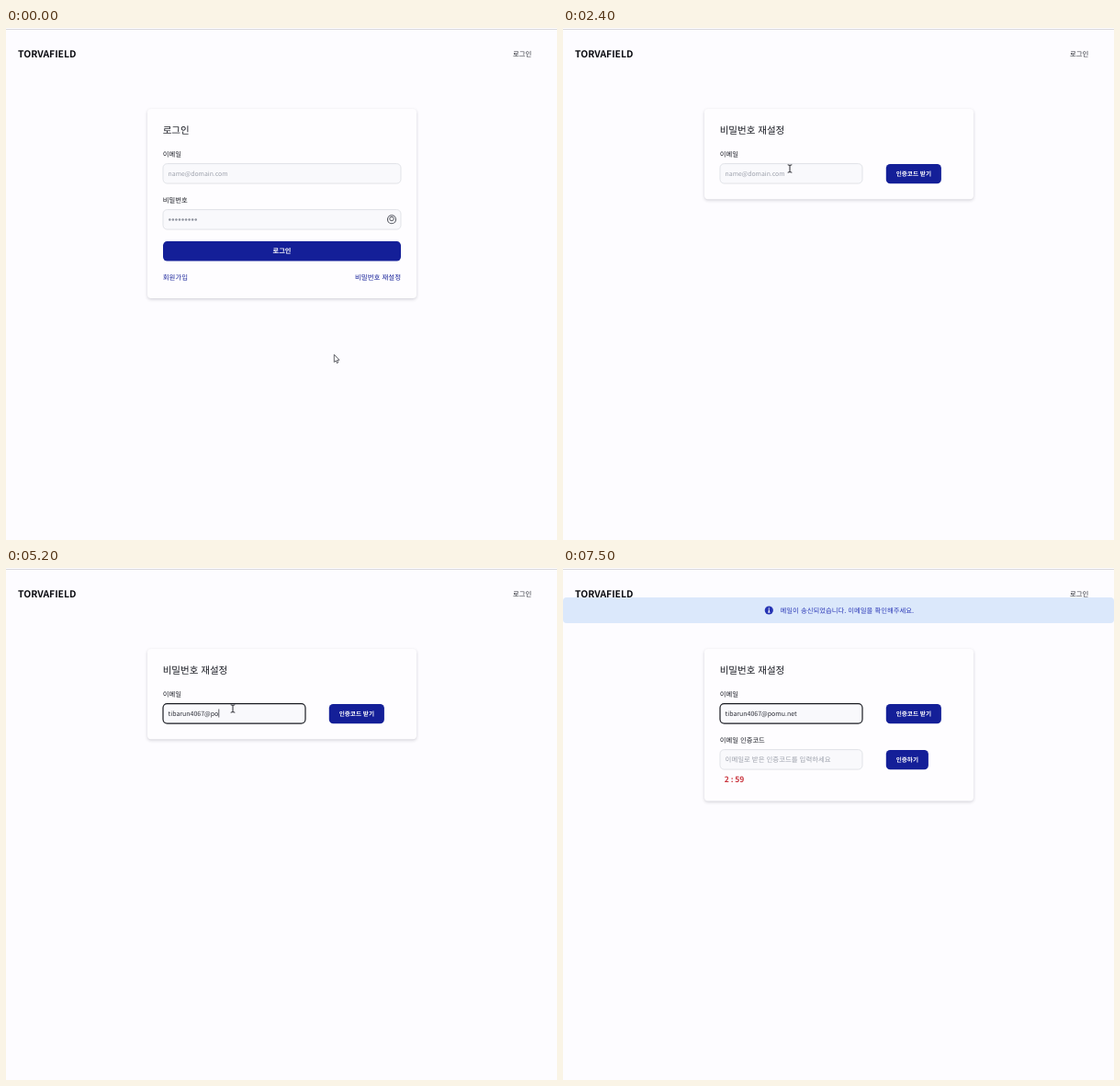
Recreate the animation shown at these times as an HTML page with a canvas. Size 600 px wide and 557 px high, loop 8000 ms.

```html
<!DOCTYPE html>
<html lang="ko">
<head>
<meta charset="utf-8">
<title>비밀번호 재설정</title>
<style>
html, body { margin: 0; width: 100%; height: 100%; overflow: hidden; background: #fdfcff; }
canvas { display: block; width: 600px; height: 557px; }
</style>
</head>
<body>
<canvas id="stage"></canvas>
<script>
const W = 600, H = 557, LOOP = 8000, STEP = 100, BLINK = 500;
const FONT = '"Noto Sans CJK KR", "Noto Sans KR", "Noto Sans CJK", sans-serif';
const NAVY = '#141f98', INK = '#15171f', GREY = '#9ca0ab';
const SWITCH = 1000, FOCUS = 2500, SENT = 6100, TICK = 7200, HIDE = 7300;

const canvas = document.getElementById('stage');
const ctx = canvas.getContext('2d');
const dpr = window.devicePixelRatio || 1;
canvas.width = W * dpr;
canvas.height = H * dpr;

// The address is typed in bursts, each at its own steady pace
const bursts = [
  { at: 3400, pace: 80, str: 'tibarun4067' },
  { at: 4500, pace: 100, str: '@' },
  { at: 5000, pace: 150, str: 'pom' },
  { at: 5500, pace: 100, str: 'u.net' }
];

// The mouse rests between legs; a bend turns a leg into a curve
const rest = { x: 357, y: 355 };
const legs = [
  { from: 0, to: 900, x: 405, y: 273 },
  { from: 1200, to: 1800, x: 262, y: 108 },
  { from: 1800, to: 2200, x: 247, y: 153, bend: { x: 161, y: 120 } }
];

const clamp = v => Math.min(1, Math.max(0, v));
const ease = k => k * k * (3 - 2 * k);
const mix = (a, b, k) => a + (b - a) * k;

function mouseAt(t) {
  let { x, y } = rest;
  for (const leg of legs) {
    if (t < leg.from) break;
    const k = ease(clamp((t - leg.from) / (leg.to - leg.from)));
    const mid = leg.bend || { x: (x + leg.x) / 2, y: (y + leg.y) / 2 };
    x = mix(mix(x, mid.x, k), mix(mid.x, leg.x, k), k);
    y = mix(mix(y, mid.y, k), mix(mid.y, leg.y, k), k);
  }
  return [x, y];
}

function typedAt(t) {
  let str = '', last = FOCUS;
  for (const b of bursts) {
    if (t < b.at) break;
    const n = Math.min(b.str.length, Math.floor((t - b.at) / b.pace) + 1);
    str += b.str.slice(0, n);
    last = b.at + (n - 1) * b.pace;
  }
  return { str, last };
}

function text(str, x, y, size, color = INK, weight = 400, align = 'left') {
  ctx.font = `${weight} ${size}px ${FONT}`;
  ctx.textAlign = align;
  ctx.fillStyle = color;
  ctx.fillText(str, x, y);
}

function paint(fill, stroke, line) {
  if (fill) { ctx.fillStyle = fill; ctx.fill(); }
  if (stroke) { ctx.strokeStyle = stroke; ctx.lineWidth = line; ctx.stroke(); }
}

function box(x, y, w, h, r, fill, stroke, line = 0.7) {
  ctx.beginPath();
  ctx.roundRect(x, y, w, h, r);
  paint(fill, stroke, line);
}

function circle(x, y, r, fill, stroke, line = 1) {
  ctx.beginPath();
  ctx.arc(x, y, r, 0, Math.PI * 2);
  paint(fill, stroke, line);
}

function card(height, title) {
  ctx.save();
  ctx.shadowColor = 'rgba(20, 20, 40, 0.19)';
  ctx.shadowBlur = 3.5 * dpr;
  ctx.shadowOffsetY = 1.2 * dpr;
  box(154, 88, 293, height, 4, '#fefdff');
  ctx.restore();
  text(title, 170.7, 115.3, 10.5);
}

function field(label, y, w, focused) {
  text(label, 170.8, y - 7.8, 7.3);
  box(171, y, w, 21.5, 4.5, '#f9f9fc', focused ? '#191b22' : '#d6d8df', focused ? 1.2 : 0.7);
}

function button(x, y, w, label, size) {
  box(x, y, w, 21.4, 4.5, NAVY);
  text(label, x + w / 2, y + 13.1, size, '#fff', 700, 'center');
}

function header() {
  ctx.fillStyle = '#d9d8de';
  ctx.fillRect(0, 1, W, 1);
  text('TORVAFIELD', 13, 31.8, 10.4, '#0c0d12', 600);
  text('로그인', 552, 30.7, 7.4, '#24262e');
}

function loginPage(hover) {
  card(206, '로그인');
  field('이메일', 147.6, 259);
  text('name@domain.com', 176.6, 160.6, 6.85, GREY);
  field('비밀번호', 197.6, 259);
  for (let i = 0; i < 9; i++) circle(178.3 + 3.55 * i, 208.4, 1.25, '#8f939e');
  circle(420, 208.3, 4.5, null, '#555861', 1.1);
  circle(420, 207.6, 2.2, null, '#555861', 1);
  button(171, 232.1, 259, '로그인', 7.2);
  text('회원가입', 170.8, 274.3, 7.4, NAVY);
  text('비밀번호 재설정', 430, 274.3, 7.45, NAVY, 400, 'right');
  if (hover) ctx.fillRect(380.5, 275.6, 49.5, 0.6);
}

function banner() {
  box(0, 32, W, 28, 4, '#dbe8fb');
  circle(224.3, 46, 4.6, '#2634b4');
  ctx.fillStyle = '#fff';
  ctx.fillRect(223.7, 43.4, 1.2, 1.2);
  ctx.fillRect(223.7, 45.3, 1.2, 3);
  ctx.fillRect(223, 47.7, 2.6, 0.8);
  text('메일이 송신되었습니다. 이메일을 확인해주세요.', 236.6, 48.7, 7.35, '#2a37b6');
}

function emailField(t) {
  const { str, last } = typedAt(t);
  field('이메일', 147.6, 155, t >= FOCUS);
  if (str) text(str, 176.6, 160.6, 7, '#2b2d36');
  else text('name@domain.com', 176.6, 160.6, 6.85, GREY);
  if (t >= FOCUS && Math.floor((t - last) / BLINK) % 2 === 0) {
    const x = 176.8 + (str ? ctx.measureText(str).width : 0);
    ctx.fillStyle = '#20222a';
    ctx.fillRect(x, 153.5, 0.7, 9);
  }
}

function resetPage(t) {
  const sent = t >= SENT;
  card(sent ? 165.5 : 98.3, '비밀번호 재설정');
  emailField(t);
  button(351.8, 147.9, 60.1, '인증코드 받기', 6.6);
  if (!sent) return;
  banner();
  field('이메일 인증코드', 197.6, 155);
  text('이메일로 받은 인증코드를 입력하세요', 176.6, 210.8, 7.4, GREY);
  button(351.8, 197.9, 46.1, '인증하기', 6.6);
  text(t < TICK ? '3 : 00' : '2 : 59', 175.7, 233.2, 8.5, '#c9323c', 700);
}

const ARROW = new Path2D('M.3 .3V8.5L2.1 6.9 3.4 9.6 4.7 9 3.5 6.4 6 6.2Z');
const HAND = new Path2D('M1.6 0H2.8V3.2L6.6 4.2V6.6L5.6 9.2H2.4L0 5.8 1.6 5.5Z');
const BEAM = new Path2D('M-2.3-4.2L0-3.6 2.3-4.2M0-3.6V3.6M-2.3 4.2L0 3.6 2.3 4.2');

function mouse(t, hover) {
  if (t >= HIDE) return;
  const [x, y] = mouseAt(t);
  const inField = y > 147 && y < 170 && x < 326;
  ctx.save();
  ctx.translate(x, y);
  if (hover) ctx.translate(-2, -2);
  const shape = hover ? HAND : inField ? BEAM : ARROW;
  ctx.fillStyle = '#fff';
  ctx.strokeStyle = inField ? '#2a2b31' : '#3c3d44';
  ctx.lineWidth = inField ? 1 : 0.8;
  if (!inField) ctx.fill(shape);
  ctx.stroke(shape);
  ctx.restore();
}

function draw(now) {
  const t = Math.floor((now % LOOP) / STEP) * STEP;
  const hover = t >= 800 && t < SWITCH;
  ctx.setTransform(dpr, 0, 0, dpr, 0, 0);
  ctx.textRendering = 'geometricPrecision';
  ctx.fillStyle = '#fdfcff';
  ctx.fillRect(0, 0, W, H);
  header();
  if (t < SWITCH) loginPage(hover);
  else resetPage(t);
  mouse(t, hover);
}

let start = null;
function frame(now) {
  if (start === null) start = now;
  draw(Math.max(0, now - start));
  requestAnimationFrame(frame);
}
draw(0);
requestAnimationFrame(frame);
</script>
</body>
</html>
```
